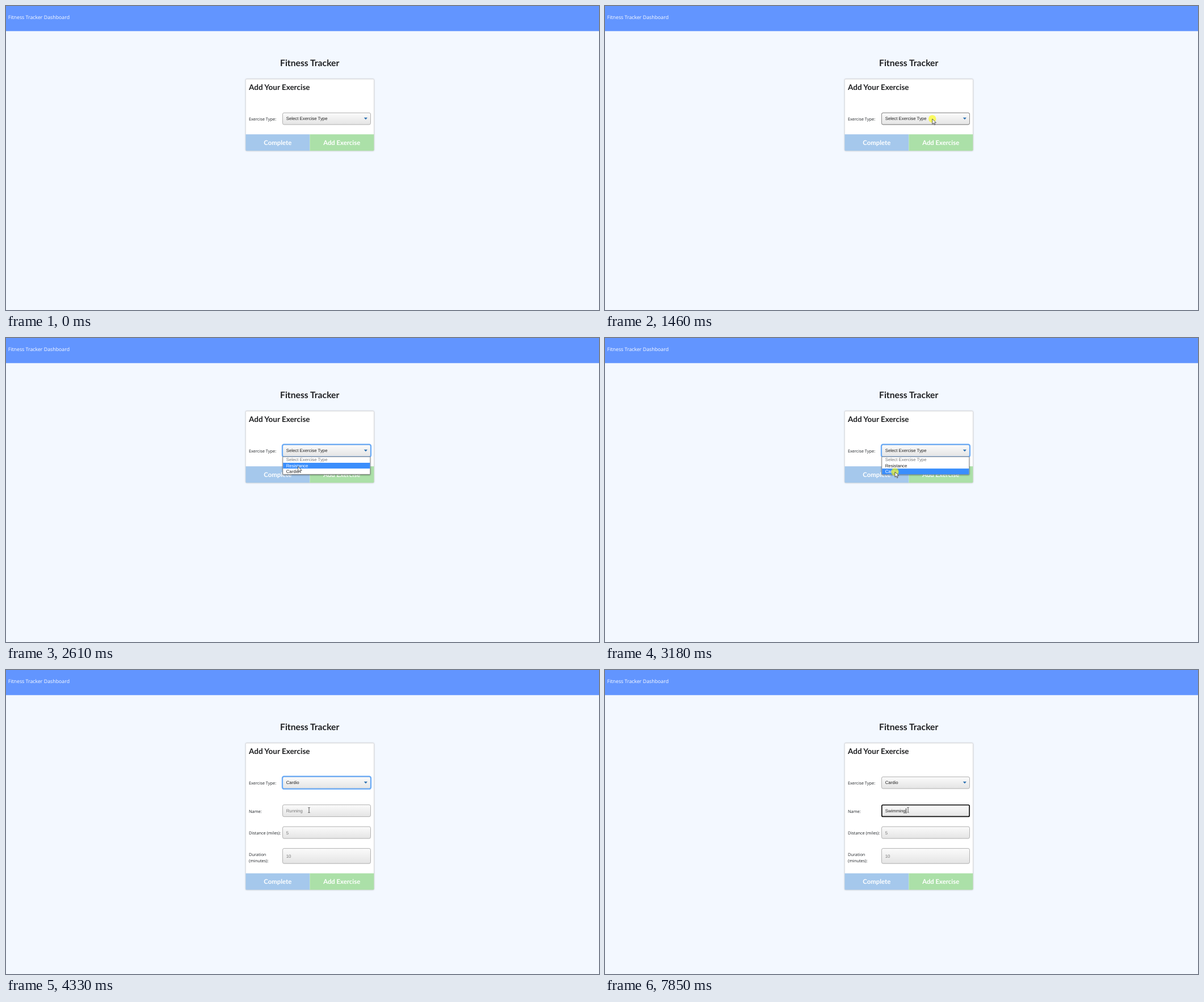
Animation, 1045 px wide and 536 px high, one loop 8000 ms. Source, as an HTML page:

```html
<!DOCTYPE html>
<html lang="en">
<head>
<meta charset="utf-8">
<title>Fitness Tracker</title>
<style>
html, body { margin: 0; width: 100%; height: 100%; overflow: hidden; background: #f3f8ff; }
svg { display: block; width: 1045px; height: 536px; text-rendering: geometricPrecision; }
text { white-space: pre; }
.nav { font: 8.8px "Open Sans", sans-serif; fill: #fff; }
.label { font: 7.4px "Open Sans", sans-serif; fill: #212529; }
.field { font: 7.82px "Liberation Sans", Arial, sans-serif; fill: #222; }
.hint { fill: #777; }
.title { font: 700 15.7px Lato, sans-serif; fill: #1e1f21; }
.head { font: 700 13.5px Lato, sans-serif; fill: #1e1f21; }
.btn { font: 700 11.35px Lato, sans-serif; fill: #fff; text-anchor: middle; }
.card { fill: #fff; stroke: #d4d4d5; stroke-width: .6; filter: drop-shadow(0 .7px 1px #b9bbbf); }
.box { fill: url(#shade); stroke: #aaa; stroke-width: .9; }
.hover { fill: none; stroke: #888; }
.ring { fill: none; stroke: #6aabf7; stroke-width: 2.3; }
.focus { fill: none; stroke: #101010; stroke-width: 1.7; }
.menu { fill: #fff; stroke: #767676; stroke-width: .8; filter: drop-shadow(.5px 1.2px .8px rgba(0,0,0,.4)); }
.open .foot { transform: translateY(132.3px); }
</style>
</head>
<body>
<svg id="stage" viewBox="0 0 1045 536">
  <defs>
    <linearGradient id="shade" x2="0" y2="1">
      <stop stop-color="#fbfbfb"/><stop offset="1" stop-color="#e4e4e4"/>
    </linearGradient>
  </defs>
  <rect width="1045" height="536" fill="#f3f8ff"/>
  <rect width="1045" height="44.3" fill="#6295ff"/>
  <text class="nav" x="3.7" y="22.9">Fitness Tracker Dashboard</text>
  <text class="title" x="535.2" y="105.9" text-anchor="middle">Fitness Tracker</text>

  <rect class="card" data-on="0 3250" x="422.4" y="129" width="226" height="126.2" rx="1.6"/>
  <rect class="card" data-on="3250 8000" x="422.4" y="129" width="226" height="258.5" rx="1.6"/>
  <text class="head" x="428" y="148.2">Add Your Exercise</text>
  <g class="foot">
    <path d="M422.4 226.2h113v29h-111.4q-1.6 0-1.6-1.6z" fill="#a5c8ec"/>
    <path d="M535.4 226.2h113v27.4q0 1.6-1.6 1.6h-111.4z" fill="#abe0a8"/>
    <text class="btn" x="478.8" y="245.2">Complete</text>
    <text class="btn" x="591.7" y="245.2">Add Exercise</text>
  </g>

  <text class="label" x="428" y="201.9">Exercise Type:</text>
  <rect class="box" x="487.5" y="188.4" width="155" height="20.7" rx="2.5"/>
  <rect class="box hover" id="hover" x="487.5" y="188.4" width="155" height="20.7" rx="2.5"/>
  <rect class="ring" data-on="1540 4500" x="487" y="187.7" width="156" height="22" rx="3"/>
  <path d="M630.8 196.8h6.2l-3.1 3.4z" fill="#2a6fb0"/>
  <text class="field" data-on="0 3250" x="493.7" y="201.3">Select Exercise Type</text>
  <text class="field" data-on="3250 8000" x="493.7" y="201.3">Cardio</text>

  <g data-on="3250 8000">
    <text class="label" x="428" y="251.6">Name:</text>
    <text class="label" x="428" y="290.2">Distance (miles):</text>
    <text class="label" x="428" y="328.2">Duration</text>
    <text class="label" x="428" y="339">(minutes):</text>
    <rect class="box" x="487.5" y="237.7" width="155" height="20.9" rx="2.5"/>
    <rect class="box" x="487.5" y="276.2" width="155" height="20.9" rx="2.5"/>
    <rect class="box" x="487.5" y="314.6" width="155" height="26.6" rx="2.5"/>
    <rect class="focus" data-on="4500 8000" x="487.8" y="238" width="154.4" height="20.4" rx="2"/>
    <text class="field hint" data-on="3250 6770" x="493.7" y="251">Running</text>
    <text class="field" id="typed" x="493.7" y="251"></text>
    <text class="field hint" x="493.7" y="289.5">5</text>
    <text class="field hint" x="493.7" y="330.8">10</text>
    <rect id="caret" data-on="4500 4960 5520 6050 6770 8000" y="244" width=".8" height="9"/>
  </g>

  <g data-on="1540 3250">
    <rect class="menu" x="487.8" y="209.4" width="154" height="31" rx=".4"/>
    <rect id="mark" x="488.2" width="153.2" height="10.2"/>
    <text class="field hint" x="493.7" y="217.4">Select Exercise Type</text>
    <text class="field option" x="493.7" y="227.5">Resistance</text>
    <text class="field option" x="493.7" y="237.6">Cardio</text>
  </g>

  <g id="pointer">
    <circle data-on="1460 1540 3180 3250 4430 4500" r="6.7" fill="#ff0" fill-opacity=".6"/>
    <path id="arrow" transform="scale(.56)" d="M0 0V16.5L3.9 13 6.4 19 9 18 6.5 12.2H11.8Z"
      fill="#fff" stroke="#222" stroke-width="1.3"/>
    <path id="beam" d="M-1.7-4.4H-.5L0-4 .5-4.4H1.7M0-4V4M-1.7 4.4H-.5L0 4 .5 4.4H1.7"
      fill="none" stroke="#333" stroke-width=".8"/>
  </g>
</svg>
<script>
const LOOP = 8000;
const $ = id => document.getElementById(id);
const show = (el, on) => { el.style.display = on ? '' : 'none'; };

// Pointer stops, spread evenly from start to end
const stops = [];
function glide(start, end, ...points) {
  points.forEach(([x, y], i) => {
    const part = points.length > 1 ? i / (points.length - 1) : 0;
    stops.push({ t: start + (end - start) * part, x, y });
  });
}
glide(140, 290, [979, 528], [795, 468], [635, 414]);
glide(530, 1300, [640, 421], [630, 392], [616, 340], [602, 285], [591, 235], [584, 200],
  [580, 184], [578, 189], [577, 194], [577, 197], [576.8, 199]);
glide(1870, 2080, [569, 203], [552, 208], [535, 212], [521.8, 216]);
glide(2160, 2240, [518, 221], [515.6, 225]);
glide(2560, 2610, [515.2, 225.6], [514.6, 226.6]);
glide(2780, 3060, [514, 228], [513, 231], [512, 234], [511, 236]);
glide(3550, 4330, [508, 240], [501, 247], [494, 255], [487, 259], [491, 257], [503, 254],
  [520, 252], [536, 250], [542, 249], [538, 248], [534, 247]);
glide(4730, 4730, [534, 246.6]);

const word = 'Swimming';
const keyTimes = [6770, 7000, 7150, 7380, 7550, 7650, 7750, 7850];

const timed = [...document.querySelectorAll('[data-on]')].map(el => {
  const edges = el.dataset.on.split(' ').map(Number);
  return { el, edges };
});
const options = document.querySelectorAll('.option');

function drawPointer(t) {
  const at = stops.filter(s => s.t <= t).pop();
  show($('pointer'), at);
  const { x, y } = at || { x: 0, y: 0 };
  const text = t >= 3250 && x > 487.5 && y > 237.5 && y < 259;
  $('pointer').setAttribute('transform', `translate(${x} ${y})`);
  show($('beam'), text);
  show($('arrow'), !text);
  show($('hover'), x > 487 && x < 643 && y > 188 && y < 209.5);

  const row = y < 220 ? 0 : y < 230.2 ? 1 : 2;
  $('mark').setAttribute('y', 209.8 + row * 10.2);
  $('mark').setAttribute('fill', row ? '#3a8efc' : '#c8c8c8');
  options.forEach((el, i) => { el.style.fill = row === i + 1 ? '#fff' : ''; });
}

function drawTyping(t) {
  const typed = word.slice(0, keyTimes.filter(k => k <= t).length);
  $('typed').textContent = typed;
  const width = typed ? $('typed').getComputedTextLength() : 0;
  $('caret').setAttribute('x', 494 + width);
}

function draw() {
  const t = performance.now() % LOOP;
  for (const { el, edges } of timed) show(el, edges.filter(e => e <= t).length % 2);
  $('stage').classList.toggle('open', t >= 3250);
  drawPointer(t);
  drawTyping(t);
  requestAnimationFrame(draw);
}
draw();
</script>
</body>
</html>
```
